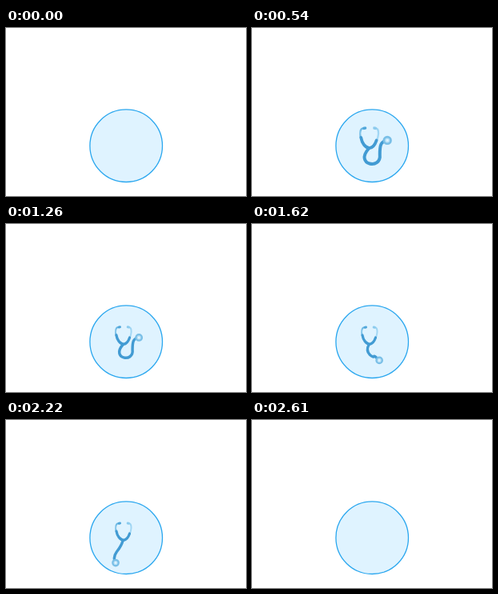
An HTML page that plays this animation: 300x210 px, repeating every 5400 ms.

```html
<!DOCTYPE html>
<html lang="en">
<head>
<meta charset="utf-8">
<title>Stethoscope</title>
<style>
  html, body { margin: 0; width: 100%; height: 100%; overflow: hidden; background: #fff; }
  svg { display: block; width: 100%; height: 100%; }
  path { fill: none; stroke-linecap: round; stroke-linejoin: round; }
</style>
</head>
<body>
<svg viewBox="0 0 300 210">
  <defs>
    <linearGradient id="left" gradientUnits="userSpaceOnUse" x1="0" y1="128" x2="0" y2="151">
      <stop offset="0" stop-color="#62b2e0"/>
      <stop offset=".3" stop-color="#8ac9ec"/>
      <stop offset=".6" stop-color="#4da4d9"/>
      <stop offset="1" stop-color="#429bd3"/>
    </linearGradient>
    <linearGradient id="right" gradientUnits="userSpaceOnUse" x1="0" y1="128" x2="0" y2="151">
      <stop offset="0" stop-color="#9bd3f2"/>
      <stop offset=".5" stop-color="#a5d9f5"/>
      <stop offset="1" stop-color="#429bd3"/>
    </linearGradient>
  </defs>
  <circle cx="150.2" cy="147.2" r="45.3" fill="#dff3ff" stroke="#2aa7ef" stroke-width="1.3"/>
  <g id="scope">
    <path id="tube" stroke="#429bd3" stroke-width="3.4"/>
    <path d="M152.500 129.300C157 128.500 157 134 156 138.500C155 143 152 148 147 150" stroke="url(#right)" stroke-width="2"/>
    <path d="M141.500 129.300C137 128.500 136.500 134 137.500 138.500C138.500 143 142 148 147 150" stroke="url(#left)" stroke-width="2"/>
    <path d="M138 139C139 145 142.500 150 147 150.300C150.500 150 153 146.500 154.500 142" stroke="#429bd3" stroke-width="3.2"/>
    <path d="M141.200 129.200L142.500 129" stroke="#50a6da" stroke-width="3"/>
    <path d="M152.200 129L153.300 129.200" stroke="#8ccbee" stroke-width="3"/>
    <g id="bell">
      <circle r="3.700" fill="#b9e1f7" stroke="#79bfe7" stroke-width="2.300"/>
      <circle r="1.200" fill="#e4f5ff"/>
    </g>
  </g>
</svg>
<script>
const $ = id => document.getElementById(id);
const { PI, sin, cos, exp, min, max, floor } = Math;
const STEP = 30, LOOP = 5400;

// Bezier points of the coiled tube, from the fork to the bell
const coil = [[146, 151], [131, 168], [160, 174], [158, 157], [158, 147], [159, 143], [166, 142]];
const [fork] = coil;

const clamp = (v, lo = 0, hi = 1) => max(lo, min(hi, v));
const progress = (t, from, span) => clamp((t - from) / span);
const ease = u => .5 - .5 * cos(PI * u);

// Grow, settle with a damped wobble, then shrink after a short swell
function size(t) {
  if (t < 450) return 1.35 * ease(progress(t, 30, 420));
  const u = progress(t, 2280, 310), back = 3.3;
  const wobble = .35 * exp((450 - t) / 310) * cos(PI * (t - 450) / 340);
  return 1 + wobble - u * u * ((back + 1) * u - back);
}

// The tube uncoils, swings like a pendulum, is pulled in and whips left
function tubePoints(t) {
  const drop = ease(progress(t, 1290, 600));
  const whip = ease(progress(t, 2190, 150));
  const pull = sin(PI * progress(t, 2040, 360));
  const angle = .2 + .4 * sin(PI * clamp((t - 1890) / 330, -.5, 1)) + 1.2 * whip;
  const length = 41 - 12 * pull;
  return coil.map(([x, y], i) => {
    const f = i / 6;
    const hangX = fork[0] - length * sin(angle) * f ** 1.4 - 6 * pull * sin(PI * f * f);
    const hangY = fork[1] + length * cos(angle) * f;
    return [x + (hangX - x) * drop, y + (hangY - y) * drop];
  });
}

function draw(now) {
  const t = floor(now % LOOP / STEP) * STEP;
  const s = max(0, size(t));
  const points = tubePoints(t);
  $("scope").setAttribute("visibility", s > .01 ? "visible" : "hidden");
  $("scope").setAttribute("transform", `translate(148 151) scale(${s}) translate(-148 -151)`);
  $("tube").setAttribute("d", `M${points[0]}C${points.slice(1).join(" ")}`);
  $("bell").setAttribute("transform", `translate(${points[6]})`);
}

let start;
function tick(now) {
  start ??= now;
  draw(now - start);
  requestAnimationFrame(tick);
}
draw(0);
requestAnimationFrame(tick);
</script>
</body>
</html>
```
